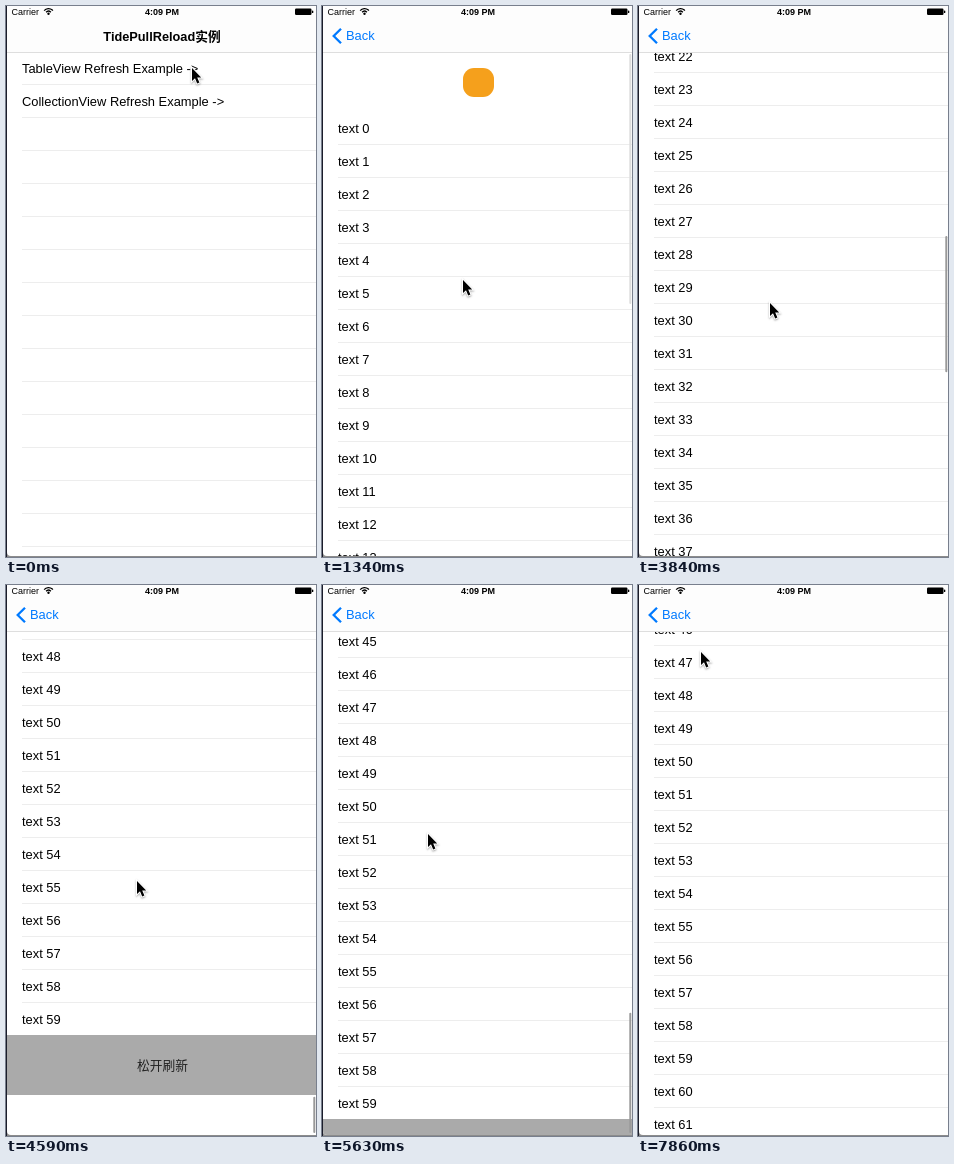
Recreate the animation shown at these times as an HTML page with a canvas. Size 310 by 551 pixels, loop 8000 ms.

```html
<!DOCTYPE html>
<html lang="zh">
<head>
<meta charset="utf-8">
<title>Pull to refresh</title>
<style>
  html, body { margin: 0; width: 100%; height: 100%; overflow: hidden; background: #fff; }
  canvas { display: block; width: 310px; height: 551px; }
</style>
</head>
<body>
<canvas id="stage"></canvas>
<script>
const W = 310, H = 551, LOOP = 8000;
const ROW = 33, NAV = 46, PANEL = 60;
const FONT = '"Liberation Sans", "Noto Sans CJK SC", "Noto Sans CJK", sans-serif';
const canvas = document.getElementById('stage');
const ctx = canvas.getContext('2d');
const dpr = window.devicePixelRatio || 1;
canvas.width = W * dpr;
canvas.height = H * dpr;

// The screen updates in beats of 148 ms, the first one at 600 ms.
const beatAt = ms => Math.max(-1, Math.min(49, Math.floor((ms - 590) / 148)));

const progress = (beat, from, to) => Math.max(0, Math.min(1, (beat - from) / (to - from)));
const ease = (...span) => {
  const p = progress(...span);
  return p * p * (3 - 2 * p);
};
const bump = (...span) => Math.sin(Math.PI * progress(...span));

function scrollAt(beat) {
  const header = ease(beat, 5, 7) - ease(beat, 9, 14) + ease(beat, 16, 17) - 1;
  const pullDown = -35 * bump(beat, 9, 14);
  const toBottom = 1475 * ease(beat, 17, 25) + 100 * bump(beat, 24, 30);
  const pullUp = 59 * ease(beat, 33, 40) + 29 * bump(beat, 33, 40);
  const settle = 2 * ease(beat, 47, 48);
  return Math.round(PANEL * header + pullDown + toBottom + pullUp + settle);
}

// The pointer glides between these resting places.
const STOPS = [
  { at: 0, x: 186, y: 62 },
  { at: 5, x: 141, y: 274 },
  { at: 15, x: 132, y: 298 },
  { at: 27, x: 131, y: 296 },
  { at: 34, x: 106, y: 249 },
  { at: 41, x: 141, y: 247 },
  { at: 49, x: 63, y: 67 }
];

function pointerAt(beat) {
  let { x, y } = STOPS[0];
  for (let i = 1; i < STOPS.length; i++) {
    const a = STOPS[i - 1], b = STOPS[i], p = ease(beat, a.at, b.at);
    x += (b.x - a.x) * p;
    y += (b.y - a.y) * p;
  }
  return [Math.round(x), Math.round(y)];
}

function rect(x, y, w, h, color) {
  ctx.fillStyle = color;
  ctx.fillRect(x, y, w, h);
}

function text(str, x, y, { size = 12.75, weight = '', align = 'left', color = '#000' } = {}) {
  ctx.font = `${weight} ${size}px ${FONT}`;
  ctx.textAlign = align;
  ctx.fillStyle = color;
  ctx.fillText(str, x, y);
}

function pill(x, y, w, h, r, color) {
  ctx.fillStyle = color;
  ctx.beginPath();
  ctx.roundRect(x, y, w, h, r);
  ctx.fill();
}

function row(label, top) {
  text(label, 16, top + 21, { size: 12.9 });
  rect(16, top + 32, W, 1, '#ededed');
}

function drawMenu(selected) {
  rect(1, 0, W, H, '#fff');
  if (selected) rect(1, NAV, W, ROW, '#d9d9d9');
  const labels = ['TableView Refresh Example ->', 'CollectionView Refresh Example ->'];
  for (let i = 0; i < 16; i++) row(labels[i] || '', NAV + i * ROW);
}

function drawFooter(top, scroll, loading) {
  rect(1, top, W, PANEL, '#aaa');
  const label = loading ? '正在加载...' : scroll >= 1535 ? '松开刷新' : '上拉刷新';
  text(label, 156.5, top + 34.5, { align: 'center', color: '#222' });
}

function drawIndicator(count, scroll, loading) {
  const view = H - NAV - 1, height = count * ROW;
  const inset = loading || scroll < 0 ? PANEL : 0;
  const start = scroll < 0 ? -PANEL : 0;
  const end = height - view - 1 + (loading ? PANEL : 0);
  const over = Math.max(0, scroll - end) + Math.max(0, start - scroll);
  const length = Math.max(8, view * view / (height + inset) + 8 - over);
  const top = 48 + progress(scroll, start, end) * (500 - length);
  pill(307.3, top, 2, length, 1, count === 30 ? '#ddd' : '#999');
}

function drawList(beat) {
  const scroll = scrollAt(beat);
  const count = beat < 16 ? 30 : beat < 48 ? 60 : 90;
  const loading = beat >= 38 && beat < 48;
  rect(1, 0, W, H, '#fff');
  if (scroll < 0) pill(141, 2 - scroll, 31, 29, 11, '#f5a01c');

  const first = Math.max(0, Math.floor(scroll / ROW));
  for (let i = first; i < Math.min(count, first + 17); i++) {
    row('text ' + i, NAV + i * ROW - scroll);
  }
  const bottom = NAV + count * ROW - scroll - 1;
  if (bottom < H) drawFooter(bottom, scroll, loading);

  const scrolling = beat < 8 || beat > 9 && beat < 14 || beat > 16 && beat < 46;
  if (scrolling) drawIndicator(count, scroll, loading);
}

function drawStatus() {
  text('Carrier', 5.5, 9, { size: 9 });
  text('4:09 PM', 156, 9, { size: 9, weight: 'bold', align: 'center' });
  ctx.strokeStyle = '#000';
  ctx.lineWidth = 1.3;
  for (const r of [3.2, 5.8]) {
    ctx.beginPath();
    ctx.arc(42.5, 8.4, r, -Math.PI * 0.77, -Math.PI * 0.23);
    ctx.stroke();
  }
  ctx.fillStyle = '#000';
  ctx.beginPath();
  ctx.arc(42.5, 7.8, 1.2, 0, Math.PI * 2);
  ctx.fill();
  pill(289, 2.5, 16.5, 6.5, 1.2, '#000');
  pill(306, 4.5, 1.3, 2.5, 0.6, '#000');
}

function drawNav(p) {
  rect(1, 0, W, NAV, '#fdfdfd');
  rect(1, NAV, W, 1, '#dedede');
  drawStatus();
  ctx.save();
  ctx.globalAlpha = 1 - p;
  text('TidePullReload实例', 156 - 110 * p, 34.5, { weight: 'bold', align: 'center' });
  ctx.globalAlpha = p;
  ctx.strokeStyle = '#007aff';
  ctx.lineWidth = 2.3;
  ctx.beginPath();
  ctx.moveTo(19, 22.7);
  ctx.lineTo(11.7, 30);
  ctx.lineTo(19, 37.3);
  ctx.stroke();
  text('Back', 24 + 90 * (1 - p), 34, { size: 12.9, color: '#007aff' });
  ctx.restore();
}

function drawPointer(beat) {
  ctx.save();
  ctx.translate(...pointerAt(beat));
  ctx.shadowColor = 'rgba(0,0,0,.35)';
  ctx.shadowBlur = 2 * dpr;
  ctx.shadowOffsetY = dpr;
  const arrow = new Path2D('M0 0V13L3 10.2L5.2 15.5L7.4 14.5L5.2 9.4H9.2Z');
  ctx.strokeStyle = '#fff';
  ctx.lineWidth = 2;
  ctx.stroke(arrow);
  ctx.shadowColor = 'transparent';
  ctx.fillStyle = '#000';
  ctx.fill(arrow);
  ctx.restore();
}

function drawScreen(beat) {
  const p = beat < 1 ? 0 : 1 - (1 - progress(beat, 0, 3)) ** 2;
  if (p < 1) {
    ctx.save();
    ctx.translate(-93 * p, 0);
    drawMenu(beat >= 0);
    ctx.restore();
  }
  if (p > 0) {
    ctx.save();
    ctx.translate(Math.round(W * (1 - p)), 0);
    drawList(beat);
    ctx.restore();
  }
  drawNav(p);
}

function frame(now) {
  const beat = beatAt(now % LOOP);
  ctx.setTransform(dpr, 0, 0, dpr, 0, 0);
  rect(0, 0, W, H, '#8c8c8c');
  rect(0, 0, 1, H, '#1b1d2b');
  ctx.save();
  ctx.beginPath();
  ctx.roundRect(1, -5, W + 4, H + 4, 4);
  ctx.clip();
  drawScreen(beat);
  ctx.restore();
  drawPointer(beat);
}

const origin = performance.now();
function tick() {
  frame(performance.now() - origin);
  requestAnimationFrame(tick);
}
tick();
</script>
</body>
</html>
```
